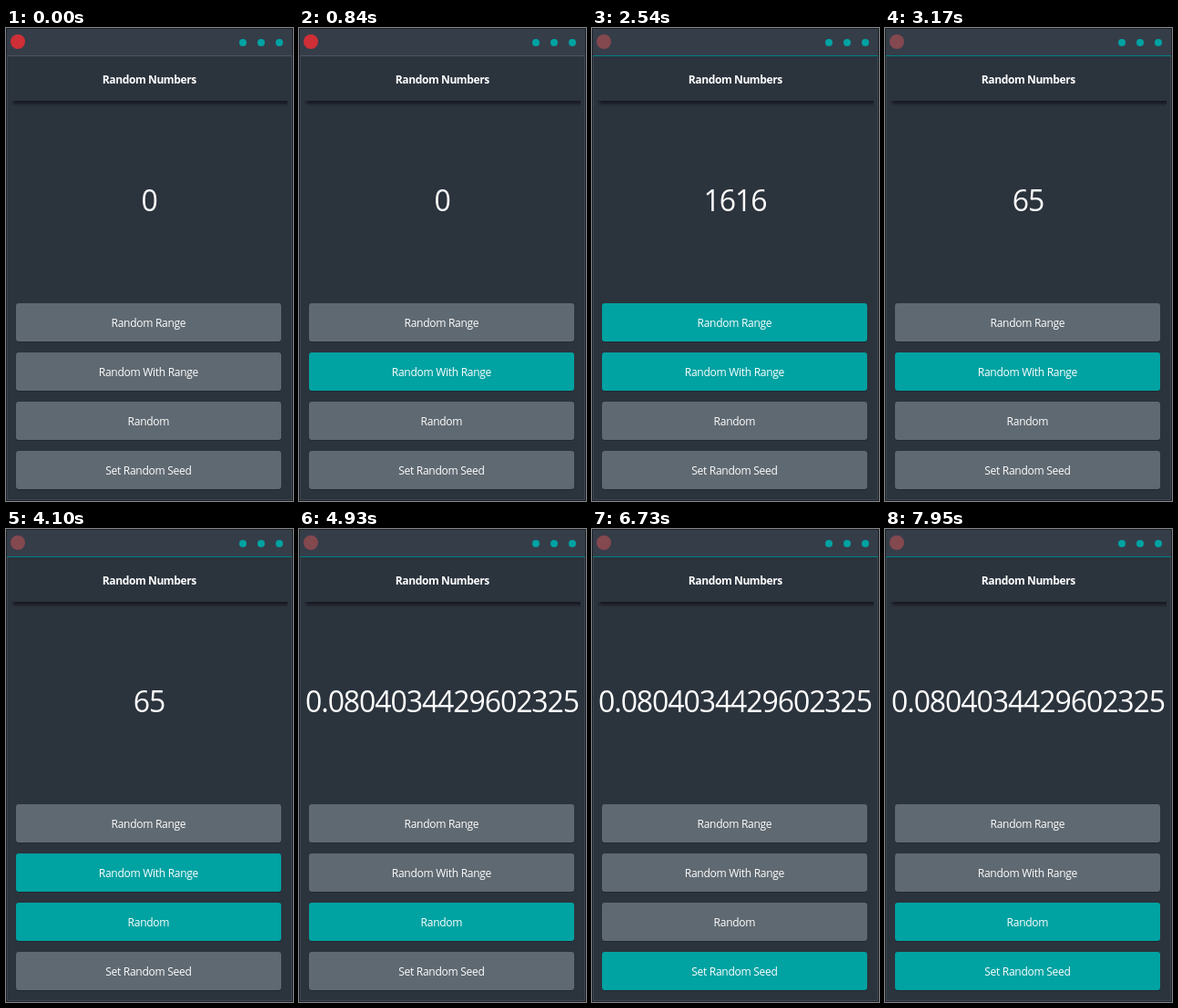
Animation of 315 by 519 pixels, one loop 8000 ms. Source, as an HTML page:

```html
<!DOCTYPE html>
<html lang="en">
<head>
<meta charset="utf-8">
<title>Random Numbers</title>
<style>
  html, body { margin: 0; width: 100%; height: 100%; overflow: hidden; background: #2b333d; }
  svg { display: block; width: 100%; height: 100%; }
  text { font: 500 12px "Open Sans", "Noto Sans", sans-serif; letter-spacing: -.023em; fill: #fff; text-anchor: middle; }
  #heading { font-weight: 700; letter-spacing: -.033em; }
  #value { font-size: 32px; font-weight: 400; letter-spacing: -.034em; }
</style>
</head>
<body>
<svg viewBox="0 0 315 519">
  <defs>
    <filter id="soft"><feGaussianBlur stdDeviation="1.8"/></filter>
    <clipPath id="below"><rect x="5" y="80" width="304" height="10"/></clipPath>
  </defs>
  <rect width="315" height="519" fill="#1b2129"/>
  <rect x="1.5" y="1.5" width="312" height="516" fill="#2b333d" stroke="#3d4551"/>
  <rect x="1" y="1" width="313" height="29" fill="#353d49"/>
  <rect id="rule" x="1" y="30" width="313" height="1"/>
  <circle id="badge" cx="13" cy="15" r="8"/>
  <g fill="#00a2a2">
    <circle cx="260" cy="16" r="4"/>
    <circle cx="280" cy="16" r="4"/>
    <circle cx="300" cy="16" r="4"/>
  </g>
  <g clip-path="url(#below)">
    <rect x="8" y="60" width="310" height="23" fill="#12161c" filter="url(#soft)"/>
  </g>
  <text id="heading" x="157.3" y="61">Random Numbers</text>
  <text id="value" x="157" y="201"></text>
  <g id="buttons"></g>
</svg>
<script>
const LOOP = 8000;
const GRAY = '#5f6971', TEAL = '#00a2a2', PRESSED = '#00898b';
const byId = id => document.getElementById(id);

// The pointer reaches each button, clicks it and the result appears on release.
const buttons = [
  { label: 'Random Range', hover: 920, press: 1520, release: 1660, result: '1616' },
  { label: 'Random With Range', hover: 2540, press: 3000, release: 3170, result: '65' },
  { label: 'Random', hover: 4100, press: 4790, release: 4930, result: '0.0804034429602325' },
  { label: 'Set Random Seed', hover: 6020, press: 6590, release: 6730 }
];
const ENTER = 770, CROSSING = 50, ACTIVATED = 1490, LEAVE = 7950;

byId('buttons').innerHTML = buttons.map(({ label }, i) => {
  const y = 302 + 54 * i;
  return `<rect x="11" y="${y + 1}" width="291" height="42" rx="3" fill="#222831"/>
    <rect class="face" x="11" y="${y}" width="291" height="42" rx="3"/>
    <text x="156.4" y="${y + 26}">${label}</text>`;
}).join('');
const faces = document.querySelectorAll('.face');

function hoveredAt(t) {
  if (t >= LEAVE) return buttons[2];
  if (t >= ENTER && t < buttons[0].hover) return buttons[2 - Math.floor((t - ENTER) / CROSSING)];
  return buttons.findLast(b => t >= b.hover);
}

function draw(t) {
  const active = t >= ACTIVATED;
  byId('rule').setAttribute('fill', active ? '#008080' : '#4b535f');
  byId('badge').setAttribute('fill', active ? '#84484f' : '#cf2f37');
  byId('value').textContent = buttons.findLast(b => b.result && t >= b.release)?.result ?? '0';

  const hovered = hoveredAt(t);
  const focused = buttons.findLast(b => t >= b.press);
  buttons.forEach((b, i) => {
    const held = t >= b.press && t < b.release;
    const lit = b === hovered || b === focused;
    faces[i].setAttribute('fill', held ? PRESSED : lit ? TEAL : GRAY);
  });
}

const origin = performance.now();
function tick() {
  draw((performance.now() - origin) % LOOP);
  requestAnimationFrame(tick);
}
tick();
</script>
</body>
</html>
```
